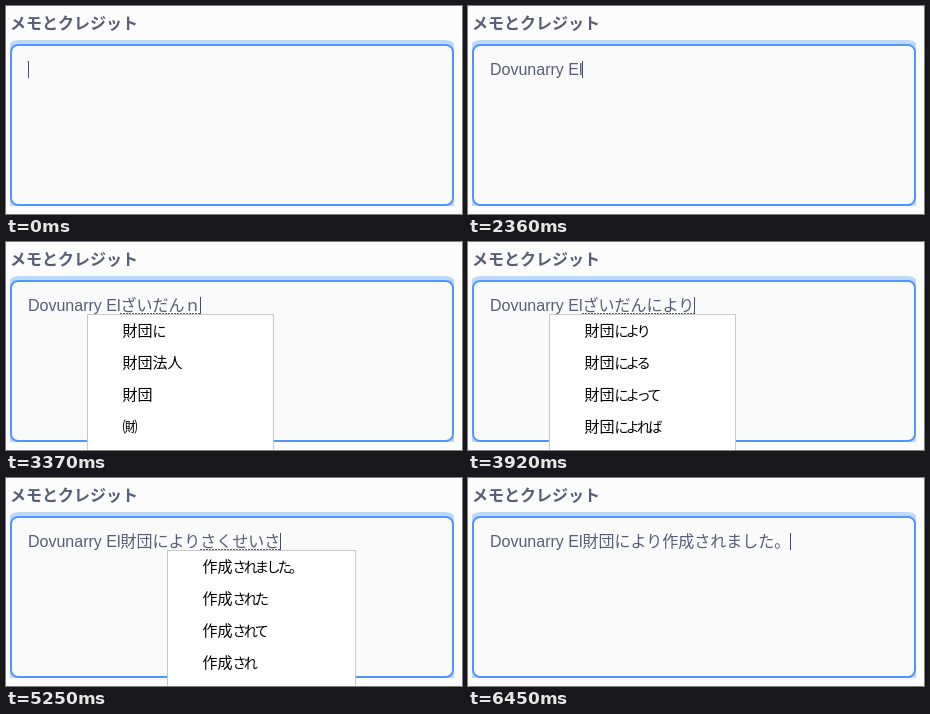
An HTML page for the animation above (6.72 s loop, 456 by 208 pixels).

```html
<!DOCTYPE html>
<html lang="ja">
<head>
<meta charset="utf-8">
<title>メモとクレジット</title>
<style>
  html, body { margin: 0; width: 100%; height: 100%; overflow: hidden; background: #fcfcfc; }
  svg { display: block; }
  text { white-space: pre; }
  .title { font: bold 16px "Noto Sans CJK JP", "Noto Sans CJK", sans-serif; fill: #575e75; }
  .input { font: 16px "Liberation Sans", "Noto Sans CJK JP", "Noto Sans CJK", sans-serif; fill: #575e75; }
  .item { font: 15px "Noto Sans CJK JP", "Noto Sans CJK", sans-serif; fill: #000; }
  .kana { font-size: 14px; letter-spacing: -2.7px; }
  .latin { font: 13.8px "Noto Sans", sans-serif; }
</style>
</head>
<body>
<svg width="456" height="208" viewBox="0 0 456 208">
  <clipPath id="clip"><rect x="4" y="0" width="444" height="200"/></clipPath>
  <rect width="456" height="208" fill="#fcfcfc"/>
  <text class="title" x="4" y="23">メモとクレジット</text>
  <g clip-path="url(#clip)">
    <rect y="34" width="452" height="170" rx="12" fill="#4d97ff" fill-opacity=".35"/>
    <rect x="5" y="39" width="442" height="160" rx="7" fill="#fafafa" stroke="#4d97ff" stroke-width="2"/>
  </g>
  <text class="input" id="input" x="22" y="69"></text>
  <path id="underline" stroke="#575e75" fill="none"/>
  <rect id="caret" y="55" width="1" height="17" fill="#474d63"/>
  <g id="popup"></g>
</svg>
<script>
const LOOP = 6720, LEFT = 22, EM = 16, ROW = 32;
const $ = id => document.getElementById(id);
const pen = document.createElement('canvas').getContext('2d');

// Candidate lists: popup width, then entries (a fifth one runs below the stage)
const lists = {
  za: [187, 'ざっと', '座席', '雑誌', '残念', '座'],
  zai: [187, '在庫', '材料', '財布', '在宅', '財'],
  zaida: [187, '財団', '財団法人', '財団に', '㈶', '財'],
  zaidan: [187, '財団に', '財団法人', '財団', '㈶', '財'],
  ni: [187, '財団に', '財団により', '財団による', '財団には', '財団'],
  niyo: [187, '財団により', '財団による', '財団によって', '財団によれば', '財団'],
  niyori: [193, '財団により', '"zaidannniyori"'],
  sa: [189, 'さらに', '作成', '参加', '最後', '先'],
  saku: [189, '作成', '作品', '昨日', '作業', '作'],
  sakusei: [189, '作成しました。', '作成した', '作成して', '作成', '作製'],
  sare: [189, '作成されました。', '作成された', '作成されて', '作成され', '作成'],
  sarete: [189, '作成されました。', '作成されます', '作成された', '作成されて', '作成'],
  mash: [215, '作成されました。', '作成されます', '作成されました', '"sakuseisaremash"'],
  mashita: [189, '作成されました。', '作成されました', '作成されましたが', '作成されまして', '作成']
};

const name = 'Dovunarry El';
const by = name + '財団により';
const made = '作成されました';

// Each step: time, settled text, text being composed, candidate list, converted
const steps = [[0, '', ''], [400, '', '']];
[460, 660, 790, 980, 1110, 1240, 1450, 1640, 1770, 1900, 2100, 2360]
  .forEach((t, i) => steps.push([t, name.slice(0, i + 1), '']));
const compose = (base, rows) => rows.forEach(([t, ...rest]) => steps.push([t, base, ...rest]));

compose(name, [
  [2560, 'ざ', 'za'],
  [2770, 'ざい', 'zai'],
  [2870, 'ざいｄ', 'zai'],
  [2970, 'ざいだ', 'zaida'],
  [3070, 'ざいだｎ', 'zaidan'],
  [3170, 'ざいだん', 'zaidan'],
  [3370, 'ざいだんｎ', 'zaidan'],
  [3440, 'ざいだんに', 'zaidan'],
  [3510, 'ざいだんに', 'ni'],
  [3590, 'ざいだんにｙ', 'ni'],
  [3660, 'ざいだんによ', 'ni'],
  [3740, 'ざいだんによ', 'niyo'],
  [3820, 'ざいだんによｒ', 'niyo'],
  [3910, 'ざいだんにより', 'niyo'],
  [3990, 'ざいだんにより', 'niyori'],
  [4190, '財団により', 'niyori', true],
  [4250, '財団により', '', true]
]);
compose(by, [
  [4520, 'さ', 'niyori'],
  [4580, 'さ', 'sa'],
  [4670, 'さｋ', 'sa'],
  [4760, 'さく', 'saku'],
  [4850, 'さくｓ', 'saku'],
  [4940, 'さくせ', 'saku'],
  [5030, 'さくせい', 'sakusei'],
  [5120, 'さくせいｓ', 'sakusei'],
  [5250, 'さくせいさ', 'sare'],
  [5380, 'さくせいさｒ', 'sare'],
  [5450, 'さくせいされ', 'sarete'],
  [5590, 'さくせいされｍ', 'sarete'],
  [5650, 'さくせいされま', 'sarete'],
  [5710, 'さくせいされまｓ', 'sarete'],
  [5780, 'さくせいされまｓｈ', 'mash'],
  [5840, 'さくせいされまし', 'mash'],
  [5910, 'さくせいされましｔ', 'mashita'],
  [6110, 'さくせいされました', 'mashita'],
  [6180, made, 'mashita', true]
]);
compose(by + made, [[6250, '。', 'mashita']]);
steps.push([6450, by + made + '。', '']);

// Full-width characters advance one em each
function widthOf(s) {
  pen.font = '16px "Liberation Sans", sans-serif';
  const latin = s.slice(0, name.length);
  return pen.measureText(latin).width + (s.length - latin.length) * EM;
}

function itemMarkup(s) {
  if (s[0] === '"') return `<tspan class="latin">${s}</tspan>`;
  return s.replace(/[ぁ-ん。]+/g, k => `<tspan class="kana">${k}</tspan>`);
}

function popupMarkup(x, [w, ...items]) {
  const h = items.length * ROW + 2;
  const frame = `<rect x="${x + .5}" y="72.5" width="${w - 1}" height="${h - 1}" fill="#fff" stroke="#c8c8c8"/>`;
  return frame + items.map((s, i) =>
    `<text class="item" x="${x + 35.5}" y="${94 + i * ROW}">${itemMarkup(s)}</text>`).join('');
}

let shown = -1;
function draw(time) {
  const index = steps.findLastIndex(s => s[0] <= time);
  if (index === shown) return;
  shown = index;
  const [t, base, comp, list, converted] = steps[index];
  const start = LEFT + widthOf(base);
  const end = LEFT + widthOf(base + comp);

  $('input').textContent = base + comp;
  $('caret').setAttribute('x', Math.floor(end));
  $('caret').setAttribute('visibility', t === 400 ? 'hidden' : 'visible');

  const line = $('underline');
  line.setAttribute('d', comp ? `M${Math.round(start)} ${converted ? 71 : 71.5}H${Math.floor(end)}` : '');
  line.setAttribute('stroke-width', converted ? 2 : 1);
  line.setAttribute('stroke-dasharray', converted ? 'none' : '2 1');

  $('popup').innerHTML = list ? popupMarkup(Math.ceil(start - 34), lists[list]) : '';
}

const began = performance.now();
function tick() {
  draw((performance.now() - began) % LOOP);
  requestAnimationFrame(tick);
}
tick();
</script>
</body>
</html>
```
